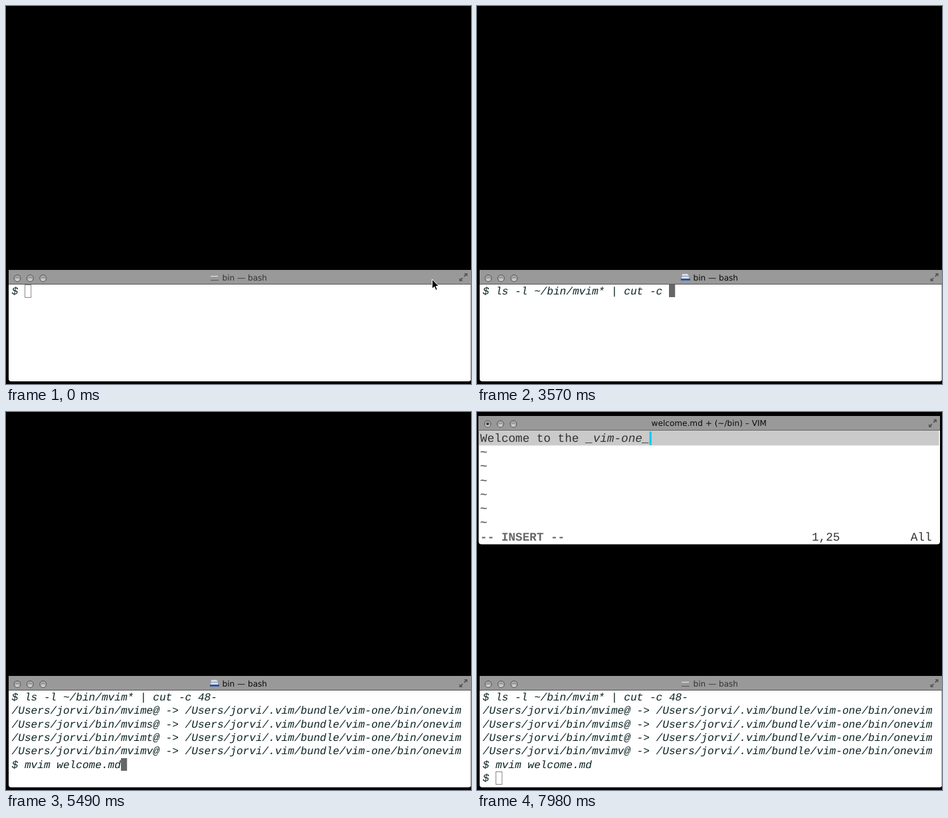
An HTML page that plays this animation: 700x570 px, repeating every 8 s.

```html
<!DOCTYPE html>
<html lang="en">
<head>
<meta charset="utf-8">
<title>Terminal session</title>
<style>
  html, body { margin: 0; width: 100%; height: 100%; overflow: hidden; background: #000; }
  svg { display: block; width: 700px; height: 570px; }
  text { white-space: pre; text-rendering: geometricPrecision; }
  .title { font: 12.1px "DejaVu Sans", sans-serif; fill: #0a0a0a; }
  .shell text { font: italic 16.11px "Liberation Mono", monospace; fill: #0c2222; }
  .editor text { font: 17.7px "Liberation Mono", monospace; fill: #333; }
  .editor .mode { font-weight: bold; fill: #666; }
  .editor .tilde { fill: #555; stroke: #555; stroke-width: .3; }
  .button { fill: #a9a9a9; stroke: #555; }
  .shine { fill: #c9c9c9; }
  .inactive .title { fill: #333; }
  .inactive .button { fill: #f4f4f4; stroke: #bbb; }
  .inactive .shine { fill: #fff; }
  .inactive .folder { visibility: hidden; }
  .flat { visibility: hidden; }
  .inactive .flat { visibility: visible; }
  .caret { fill: #666; }
  .inactive .caret { fill: #fff; stroke: #888; }
</style>
</head>
<body>
<svg viewBox="0 0 700 570">
  <defs>
    <g id="light">
      <circle class="button" r="5"/>
      <ellipse class="shine" cy="2.2" rx="3.2" ry="2"/>
      <path d="M-2.5 -.5Q0 -2 2.5 -.5" fill="none" stroke="#777" stroke-width=".7"/>
    </g>
    <g id="lights">
      <use href="#light"/>
      <use href="#light" x="19.3"/>
      <use href="#light" x="38.8"/>
    </g>
    <g id="expand" fill="#555" stroke="#555">
      <path d="M1.2 -1.2L5 -5M-1.2 1.2L-5 5" stroke-width="1.8"/>
      <path d="M1 -6H6V-1ZM-1 6H-6V1Z" stroke="none"/>
    </g>
  </defs>

  <g id="terminal">
    <path d="M4 398H700V562Q700 566 696 566H8Q4 566 4 562Z" fill="#fff"/>
    <path d="M4 398H700V419H4Z" fill="#999"/>
    <path d="M4 419.5H700" stroke="#555"/>
    <path d="M699.5 420V563" stroke="#aaa"/>
    <use href="#lights" x="17" y="410.5"/>
    <g class="folder">
      <path d="M309 404H317L319 407V411H308Z" fill="#d8dde8"/>
      <path d="M308 407.5H319" stroke="#8795b5"/>
      <path d="M307 412.5H321" stroke="#1647b5" stroke-width="2.4"/>
    </g>
    <g class="flat">
      <path d="M308 407.5H319" stroke="#eee"/>
      <path d="M308 413.5H320" stroke="#555"/>
    </g>
    <text class="title" x="325.5" y="413.5">bin — bash</text>
    <use href="#expand" x="688.5" y="409"/>
    <rect id="shellCaret" class="caret" width="9.2" height="19"/>
    <g id="shell" class="shell"></g>
  </g>

  <path id="pointer" d="M641.5 412V426.5L644.8 423.4L647 428.5L649.4 427.5L647.2 422.6H651.5Z" fill="#000" stroke="#fff"/>

  <g id="vim">
    <path d="M2.5 6H697V195Q697 199.5 692.5 199.5H7Q2.5 199.5 2.5 195Z" fill="#fff"/>
    <path d="M2.5 6H697V27H2.5Z" fill="#999"/>
    <path d="M2.5 27.5H697" stroke="#666"/>
    <use href="#lights" x="16" y="18"/>
    <circle cx="16" cy="18" r="2" fill="#333"/>
    <text id="vimTitle" class="title" x="349.3" y="21" text-anchor="middle"></text>
    <use href="#expand" x="686" y="17"/>
    <path d="M3 28H695.5V50.5H3Z" fill="#cacaca"/>
    <rect id="vimCaret" y="29.5" height="20.5"/>
    <g id="editor" class="editor">
      <text x="4.8" y="45"><tspan id="plain"></tspan><tspan id="emphasis" font-style="italic"></tspan></text>
      <text class="mode" x="4.8" y="193.5">-- INSERT --</text>
      <text id="ruler" x="504" y="193.5"></text>
      <text x="652.7" y="193.5">All</text>
    </g>
  </g>
</svg>
<script>
const LOOP = 8000;
const FOCUS = 240, LIST = 3980, LAUNCH = 5550, VIM_OPEN = 5620;
const SHELL = { x: 8.6, y: 435, col: 9.667, row: 20.35 };
const EDITOR = { x: 4.8, y: 45, col: 10.62, row: 21.2 };

// Bursts of typing: start time, ms per key, keys
const listKeys = [[300, 150, "ls -l ~/b"], [1660, 108, "in/mvim* | cut -c "], [3640, 120, "48-"]];
const openKeys = [[4070, 105, "mvim wel"], [4910, 90, "come.md"]];
const bodyKeys = [[6080, 75, "Welcome to the"], [7130, 92, " _vim-one_"]];

const $ = id => document.getElementById(id);
const show = (el, on) => el.style.display = on ? "" : "none";

function addText(parent, x, y, content = "", className = "") {
  const el = document.createElementNS("http://www.w3.org/2000/svg", "text");
  el.setAttribute("x", x);
  el.setAttribute("y", y);
  el.setAttribute("class", className);
  el.textContent = content;
  parent.append(el);
  return el;
}

const typed = (bursts, t) => bursts.map(([start, step, keys]) =>
  keys.slice(0, Math.max(0, Math.floor((t - start) / step) + 1))).join("");

const rows = Array.from({ length: 7 }, (_, i) =>
  addText($("shell"), SHELL.x, SHELL.y + i * SHELL.row));
for (let i = 1; i < 7; i++)
  addText($("editor"), EDITOR.x, EDITOR.y + i * EDITOR.row, "~", "tilde");

const home = "/Users/jorvi";
const links = [..."estv"].map(c =>
  `${home}/bin/mvim${c}@ -> ${home}/.vim/bundle/vim-one/bin/onevim`);

function drawShell(t) {
  const lines = ["$ " + typed(listKeys, t)];
  if (t >= LIST) lines.push(...links, "$ " + typed(openKeys, t));
  if (t >= LAUNCH) lines.push("$ ");
  rows.forEach((row, i) => row.textContent = lines[i] || "");

  const last = lines.length - 1;
  const active = t >= FOCUS && t < VIM_OPEN;
  const inset = active ? 0 : .5;
  $("terminal").setAttribute("class", active ? "" : "inactive");
  $("shellCaret").setAttribute("x", Math.round(SHELL.x + lines[last].length * SHELL.col - .4) + inset);
  $("shellCaret").setAttribute("y", Math.round(420 + last * SHELL.row) + inset);
  show($("pointer"), t < listKeys[0][0]);
}

function drawVim(t) {
  show($("vim"), t >= VIM_OPEN);
  const body = typed(bodyKeys, t), n = body.length;
  const split = body.includes("_") ? body.indexOf("_") : n;
  $("plain").textContent = body.slice(0, split);
  $("emphasis").textContent = body.slice(split);
  $("vimTitle").textContent = `welcome.md ${n ? "+ " : ""}(~/bin) – VIM`;
  $("ruler").textContent = n ? `1,${n + 1}` : "0,1";
  const caret = $("vimCaret");
  caret.setAttribute("x", EDITOR.x + n * EDITOR.col);
  caret.setAttribute("width", n ? 3 : 2.5);
  caret.setAttribute("fill", n ? "#00c8f0" : "#0a5fd0");
}

function frame() {
  const t = performance.now() % LOOP;
  drawShell(t);
  drawVim(t);
  requestAnimationFrame(frame);
}
frame();
</script>
</body>
</html>
```
